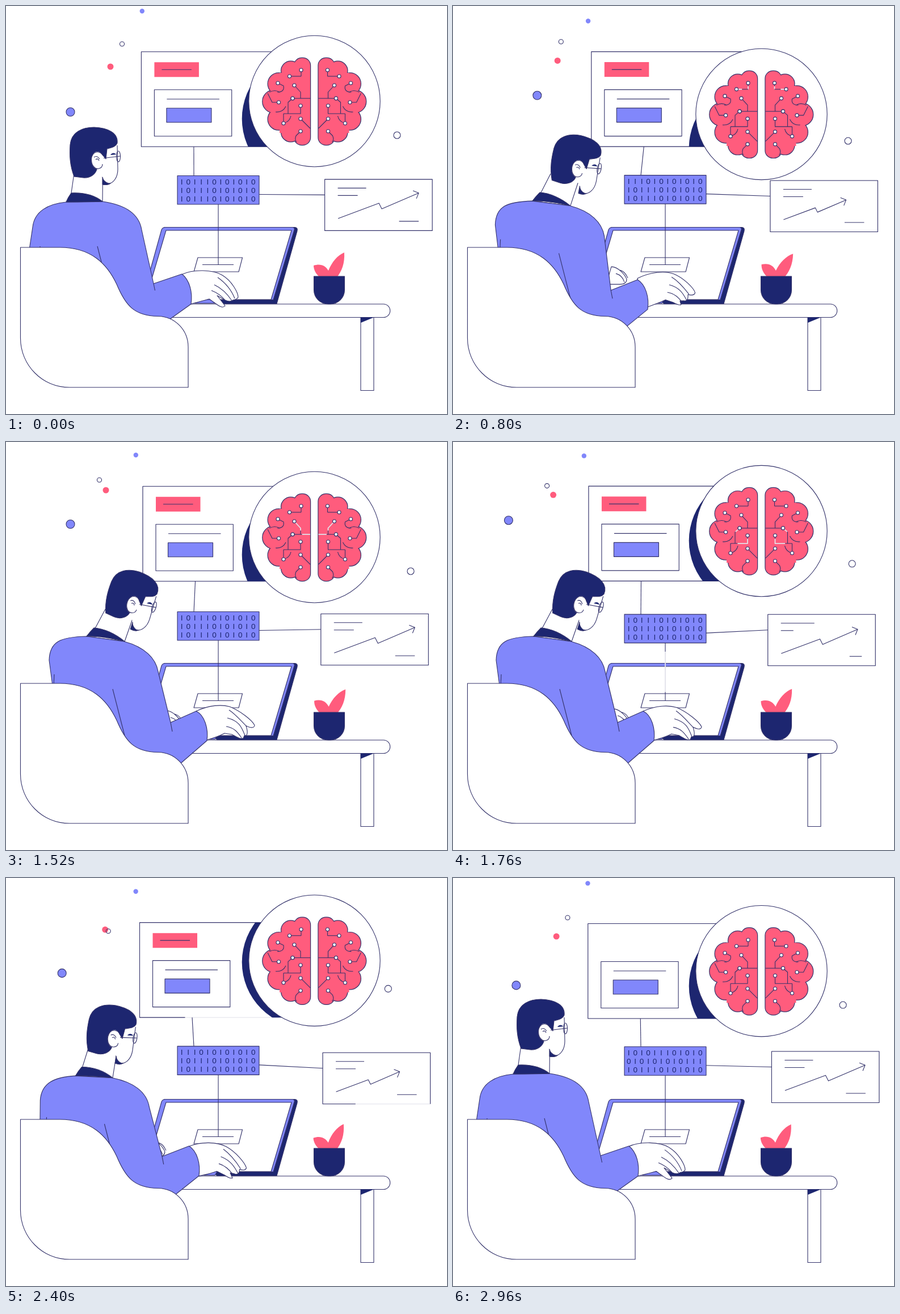
An HTML page with a canvas that plays this animation: 777 px wide and 720 px high, repeating every 3040 ms.

```html
<!DOCTYPE html>
<html lang="en">
<head>
<meta charset="utf-8">
<title>Working with a neural assistant</title>
<style>
html, body { margin: 0; width: 100%; height: 100%; overflow: hidden; background: #fff; }
canvas { display: block; }
</style>
</head>
<body>
<canvas id="stage" width="777" height="720"></canvas>
<script>
const ctx = document.getElementById('stage').getContext('2d');
const LOOP = 3040, STEP = 80;
const NAVY = '#1d2670', BLUE = '#8187fb', RED = '#ff5c7d', INK = '#34336b', WHITE = '#fff';
let t = 0;

const { sin, cos, PI } = Math;
const turn = () => 2 * PI * t / LOOP;
// Floating motion: one swing per loop plus an optional second harmonic.
const sway = (mid, c, s, c2 = 0, s2 = 0) =>
  mid + c * cos(turn()) + s * sin(turn()) + c2 * cos(2 * turn()) + s2 * sin(2 * turn());
const ramp = (a, b) => Math.min(1, Math.max(0, (t - a) / (b - a)));
const ease = (a, b) => { const u = ramp(a, b); return u * u * (3 - 2 * u); };
const bump = (a, b) => sin(PI * ramp(a, b));

// Blend two paths of absolute coordinates; k and dy may depend on the number's index.
function mix(a, b, k, dy) {
  const goal = b.match(/[\d.]+/g);
  let i = 0, x = 0;
  return a.replace(/[\d.]+/g, s => {
    let r = +s + (goal[i] - s) * k(i);
    if (i % 2) r += dy(i, x); else x = r;
    i++;
    return r.toFixed(2);
  });
}

function paint(path, fill, stroke = INK, width = 1.1) {
  const p = typeof path === 'string' ? new Path2D(path) : path;
  if (fill) { ctx.fillStyle = fill; ctx.fill(p); }
  if (stroke) { ctx.strokeStyle = stroke; ctx.lineWidth = width; ctx.stroke(p); }
}
function disc(x, y, r, fill, stroke = INK, ry = r) {
  const p = new Path2D();
  p.ellipse(x, y, r, ry, 0, 0, 7);
  paint(p, fill, stroke);
}
function box(x, y, w, h, fill, stroke) {
  const p = new Path2D();
  p.rect(x, y, w, h);
  paint(p, fill, stroke);
}
const line = (...pts) => paint('M' + pts.join(' '), null);

function dashed(path, from, length, color, width) {
  ctx.setLineDash([length, 9999]);
  ctx.lineDashOffset = -from;
  paint(path, null, color, width);
  ctx.setLineDash([]);
}

// A light gap runs along a line of the given length.
function pulse(path, len, u, gap) {
  if (u <= 0 || u >= 1) return;
  const from = u * (len + gap) - gap;
  dashed(path, Math.max(0, from), Math.min(gap, gap + from), 'rgba(255,255,255,.85)', 1.8);
}

// Card outline whose ink is wiped and redrawn from the bottom right corner.
function card(x, y, w, h) {
  const path = `M${x + w} ${y + h}H${x}V${y}H${x + w}Z`, len = 2 * (w + h);
  paint(path, WHITE, '#d8d8e4', .8);
  if (t < 2320 || t > 2880) return paint(path, null);
  const head = ramp(2320, 2660) * len, tail = ramp(2660, 2900) * len;
  dashed(path, head, len - head, INK);
  if (tail) dashed(path, 0, tail, INK);
}

function dots() {
  disc(sway(234.3, 5.5, 5, 0, 4.5), sway(21, -7, 0, -5), 4.2, BLUE, null);
  disc(sway(180, 4, 5, 0, 3), sway(96, 11, 3, 0, 10), 5.5, RED, null);
  disc(sway(184.5, 20, 8, 0, 3), sway(73, 0, -16, -6), 4);
  disc(sway(117.5, 0, 26, -4, -6), sway(162, 21, 0, 4, -9), 7.5, BLUE);
  disc(sway(693, -12, 10, 8), sway(222, 0, 22, 6), 6);
}

function pageCard(x, y) {
  card(x, y, 300, 167.5);
  ctx.save();
  const s = 1 + .04 * bump(2540, 2900);
  ctx.translate(x + 23, y + 180);
  ctx.scale(s, s);
  ctx.translate(-23, -180);
  if (t < 2880 && !(t >= 400 && t < 600)) {
    box(23, 18.5, 78.5, 26, RED, null);
    line(36, 31.5, 88.5, 31.5);
  }
  box(23, 67, 136.3, 82, WHITE, INK);
  line(45, 83.5, 137.5, 83.5);
  box(44.5, 99.5, 79, 25, BLUE, INK);
  ctx.restore();
}

// Each circuit starts at its node; the order is the order of the light pulses.
const CIRCUITS = [
  'M519 199L536 216', 'M519 221L511 229Q508 236 512 240', 'M520 113V124', 'M499.5 124H520',
  'M479 136L489 141Q491 152 478 152', 'M480.5 170H469L461 154', 'M505 163H536',
  'M508 140L519 152V163', 'M519 176V190H489', 'M505 163L497 170V190', 'M489 207V190'
];
const lobes = new Path2D();
for (let i = 0; i <= 6; i++) {
  const a = i * PI / 6, r = 13.5 + 6.2 * sin(a);
  const x = 522 - 50 * Math.abs(sin(a)) ** 1.3, y = 168.5 - 62.5 * cos(a);
  lobes.moveTo(x + r, y);
  lobes.arc(x, y, r, 0, 7);
}
lobes.roundRect(508, 92, 28, 153, 13);

function halfBrain() {
  paint(lobes, null, INK, 2.4);
  paint(lobes, RED, null);
  box(482, 118, 50, 106, RED, null);
  paint('M464 152Q474 147 482 152M475 187Q488 188 493 177M489 207Q500 204 502 194', null);
  CIRCUITS.forEach((path, i) => {
    const start = 250 + i * 160;
    paint(path, null);
    pulse(path, 40, ramp(start, start + 480), 26);
  });
  for (const path of CIRCUITS) {
    const [x, y] = path.match(/[\d.]+/g);
    disc(+x, +y, 3, WHITE);
  }
}

function brain(cardY) {
  const cy = sway(168, 0, 23);
  ctx.save();
  ctx.beginPath();
  ctx.rect(400, cardY, 140, 167.5);
  ctx.clip();
  disc(531.7, sway(199, 0, 52), 116, NAVY, null);
  ctx.restore();
  disc(543.5, cy, 115.7, WHITE);
  ctx.save();
  ctx.translate(0, cy - 168);
  halfBrain();
  ctx.translate(1086.5, 0);
  ctx.scale(-1, 1);
  halfBrain();
  ctx.restore();
}

function chart(x, y) {
  card(x, y, 189.5, 90.5);
  ctx.save();
  ctx.translate(x, y);
  const typed = bump(1520, 2000);
  line(23, 15.5, 73 + 9 * typed, 15.5);
  line(23, 28.5, 58 - 13 * typed, 28.5);
  line(131 + 13 * typed, 74, 165.5, 74);
  const s = sway(126, 0, 0, 16) / 142;
  const px = n => 23.5 + n * s, py = n => 69 - n * s;
  const ex = px(142), ey = py(45);
  line(px(0), py(0), px(72), py(27), px(77), py(17), ex, ey);
  line(ex - 10, ey - 4, ex, ey, ex - 4, ey + 10);
  ctx.restore();
}

const BITS = '101110101010';
function binary(y) {
  box(302, y, 144, 50.5, BLUE, INK);
  ctx.font = '13.5px "Liberation Sans", Arial, sans-serif';
  ctx.textAlign = 'center';
  ctx.fillStyle = NAVY;
  const u = t % (LOOP / 2);
  const shifts = u < 560 ? [0, 0, 0] : u < 960 ? [2, 0, 0] : [10, 5, 0];
  shifts.forEach((shift, row) => {
    for (let c = 0; c < 12; c++)
      ctx.fillText(BITS[(c + shift) % 12] === '1' ? 'I' : '0', 309.7 + c * 11.45, y + 15 + row * 15);
  });
}

function link(x1, y1, x2, y2, start) {
  line(x1, y1, x2, y2);
  const len = Math.hypot(x2 - x1, y2 - y1);
  pulse(`M${x1} ${y1}L${x2} ${y2}`, len, ramp(start, start + 320), len * .7);
}

function desk() {
  paint('M200 526H665A11.7 11.7 0 0 1 665 549.5H200Z', WHITE);
  box(625, 549.5, 23, 129, WHITE, INK);
  paint('M625 549.5H648L625 559Z', NAVY, null);
  paint('M279 390.5H509Q514.5 391 513 397L477 525.5H372Q366 522 372 518L240 518Z', NAVY);
  paint('M280 390.5H505Q509 391 508 395L471 518.5H372L368 524.5H238L274 395Q275.5 391 280 390.5Z', BLUE);
  paint('M282 396H503L467 518H246Z', WHITE);
  paint('M338 444H416.5L410 469H331Z', WHITE);
  line(346, 456.5, 401, 456.5);
}

function plant() {
  ctx.save();
  ctx.translate(568, 478);
  ctx.rotate(sway(1.5, -1.5, 2.7) * PI / 180);
  paint('M-13 2C-21 -3 -26 -12 -26 -20C-14 -24 -5 -20 0 -11C6 -26 16 -38 28 -43C29 -24 24 -10 14 2Z', RED, null);
  ctx.restore();
  paint('M542.5 477H596.5V501A25 25 0 0 1 571.5 526H567.5A25 25 0 0 1 542.5 501Z', NAVY);
}

function head(x, y, tilt) {
  ctx.save();
  ctx.translate(x, y);
  ctx.rotate(tilt * PI / 180);
  ctx.translate(-161, -272);
  paint('M170 301C172 308 178 313 185 312C181 316 175 316 170 315Z', NAVY);
  paint('M172 254L196 246L197 288C197 304 188 313 181 313C175 312 171 307 170 302L160 285Z', WHITE, null);
  paint('M196 246L197 288C197 304 188 313 181 313C175 312 171 307 170 302', null);
  paint('M120 301C112 280 112 262 113 245C115 222 135 214 155 214C180 215 198 224 196 242C193 249 185 250 178 252L176 270L171 264C165 255 152 256 150 270C150 280 155 287 160 288C158 297 148 304 136 303Z', NAVY);
  disc(161, 272, 10.5, WHITE, null, 15);
  paint('M171 264C165 254 152 256 150.5 270C150 280 156 288 163 287C168 286 170 283 170 279M155 267Q160 263 165 270M158 271Q162 268 164 273', null);
  paint('M184 263C186 259 191 258 194 262Z', NAVY, null);
  disc(198, 265.5, 3.5, null, INK, 9.5);
  line(172, 268.5, 201, 265);
  ctx.restore();
}

function man() {
  // The torso leads, the arm follows; the body dips while it moves.
  const lean = ease(200, 900) * (1 - ease(1900, 2850));
  const reach = ease(400, 1100) * (1 - ease(1900, 2900));
  const sink = 18 * lean * (1 - lean), drop = 26 * (lean - reach);
  const curl = sway(0, 0, -5);
  const torso = () => lean, torsoY = () => sink;
  const arm = () => reach, armY = () => drop;

  paint(`M${228 + 54 * lean} ${sway(467, 0, 0, 7)}c12 0 24 14 27 22c0 6 -4 9 -12 9h-24zm8 12q11 3 15 15m-8 -21q9 2 14 14`, WHITE);

  const wristX = 309 + 26 * reach;
  const handY = (i, x) => drop * .7 + curl * (x - wristX) / 90;
  paint(mix('M309 474C330 464 365 465 381 475C398 485 409 506 409 514C407 518 403 518 400 519C396 522 390 521 386 519L372 511L386 529C383 533 377 531 372 527L358 517C345 521 335 523 322 527Z',
    'M335 475C358 464 380 463 394 467C412 474 434 491 438 500C437 505 432 505 423 501C427 514 425 519 420 518L418 523L412 523C408 522 402 518 398 516L385 514C374 520 364 523 350 527Z', arm, handY), WHITE);
  paint(mix('M373 479C386 488 397 501 403 516M367 492C380 498 390 508 398 520M362 502C372 506 380 512 386 519',
    'M393 473C404 480 412 490 424 502M390 487C410 492 415 502 421 518M388 502C402 504 408 512 415 522', arm, handY), null);

  paint(mix('M120 295L115 330L106 346L170 345L170.5 300', 'M175 295L158 327L142 343L209 352L223 312', torso, torsoY), WHITE);
  paint(mix('M41 430L47 390C50 362 75 349 106 346L170 345C205 350 234 364 239 395L260 490L310 473C324 484 329 506 326 526L291 551L240 600L60 600Z',
    'M82 430L76 385C77 352 96 344 142 343L208 352C245 362 264 382 268 405L290 495L335 475C350 482 357 506 354 527L309 566L240 600L80 600Z',
    i => i < 18 ? lean : reach, i => i < 18 ? sink : drop), BLUE);
  paint(mix('M260 490L262.5 502', 'M290 495L293 511', arm, armY), null);
  paint(mix('M161 424L182 506M60 424L60 432', 'M188 436L209 518M85 410L84 430', torso, torsoY), null);
  paint(mix('M115 330C135 329 155 333 170 345C150 346 125 346 106 346C109 338 112 334 115 330Z',
    'M155 328C172 329 192 338 209 352C185 346 160 342 142 343C147 336 151 332 155 328Z', torso, torsoY), NAVY);
  head(161 + 62.5 * lean, 272 + 14.5 * lean + sink, 17.5 * reach);
  paint('M25.5 426H95C150 426 178 455 195 491C210 527 225 547 268 547.5C298 548 321 572 321 602V673H112C64 673 25.5 634 25.5 586Z', WHITE);
}

function draw() {
  ctx.fillStyle = WHITE;
  ctx.fillRect(0, 0, 777, 720);
  ctx.lineJoin = 'round';
  const cardX = sway(239.7, -1.3, 4), cardY = sway(79.5, 1.2, 1.2);
  const chartX = sway(558.2, 3.4, 1), chartY = sway(306.4, 1.3, 0, -1.8);
  const bitsY = sway(299.5, 0, 0, 0, 5.5);
  dots();
  pageCard(cardX, cardY);
  brain(cardY);
  chart(chartX, chartY);
  desk();
  link(331, bitsY, cardX + 92.5, cardY + 167.5, 2000);
  link(446, bitsY + 33, chartX, chartY + 27.5, 2000);
  link(374, 456.5, 374, bitsY + 50.5, 1600);
  binary(bitsY);
  plant();
  man();
}

let begin;
function frame(now) {
  begin ??= now;
  t = Math.floor((now - begin) % LOOP / STEP) * STEP;
  draw();
  requestAnimationFrame(frame);
}
requestAnimationFrame(frame);
</script>
</body>
</html>
```
